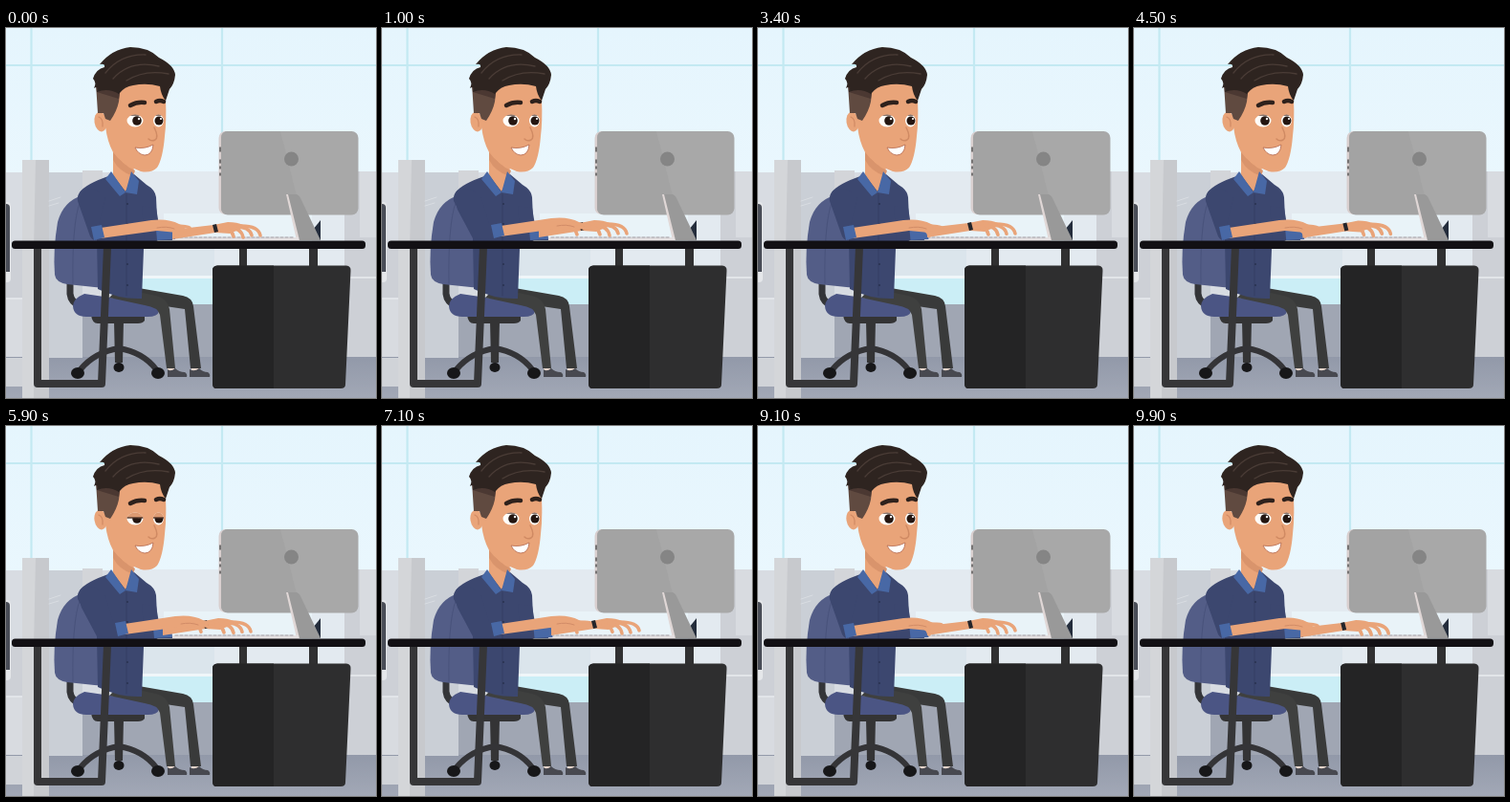
An HTML page that plays this animation: 387 by 387 pixels, repeating every 10 s.

```html
<!DOCTYPE html>
<html lang="en">
<head>
<meta charset="utf-8">
<title>Typing at a desk</title>
<style>
html, body { margin: 0; width: 100%; height: 100%; overflow: hidden; background: #e6f5fd; }
svg { display: block; width: 100vw; height: 100vh; }
.skin { fill: #e9a479; }
.shade { fill: #d9946c; }
.shirt { fill: #3c476f; }
.cuff { fill: #4868a5; }
.dark { fill: #343435; }
.hair { fill: #2e2420; }
.line { fill: none; stroke-linecap: round; stroke-linejoin: round; }
</style>
</head>
<body>
<svg viewBox="0 0 387 387">
  <defs>
    <linearGradient id="sky" x2="0" y2="1">
      <stop stop-color="#e5f5fd"/><stop offset=".6" stop-color="#ecf8fe"/><stop offset="1" stop-color="#d5f0f8"/>
    </linearGradient>
    <linearGradient id="floor" x2="0" y2="1">
      <stop stop-color="#9299a9"/><stop offset="1" stop-color="#a2a8b6"/>
    </linearGradient>
    <clipPath id="eyes">
      <ellipse cx="135" cy="97" rx="8.5" ry="6.5"/><ellipse cx="159.500" cy="97" rx="5.5" ry="6.5"/>
    </clipPath>
  </defs>

  <!-- office -->
  <path fill="url(#sky)" d="M0 0H387V387H0Z"/>
  <path class="line" stroke="#c3e9f2" stroke-width="2.2" d="M0 39H387M26.5 0V150M226 0V190"/>
  <path fill="#d8dce2" d="M0 151H130V300H0Z"/>
  <path fill="#e3eaf0" d="M130 150H387V260H130Z"/>
  <path fill="#e9f3f8" d="M165 194H320V223H165Z"/>
  <path fill="#dbe5ec" d="M130 231H218V259H130Z"/>
  <path fill="#f0f6f9" d="M130 259H218V262H130Z"/>
  <path fill="#cbeef6" d="M130 262H218V289H130Z"/>
  <path fill="#cdd0d6" d="M0 231H80V345H0ZM354 150H387V345H354Z"/>
  <path fill="#d8dbe0" d="M0 284H17V345H0ZM370 150H387V219H370Z"/>
  <path fill="#e2e5e9" d="M0 282H17V284H0ZM360 260H387V262H360Z"/>
  <path fill="#a0a6b3" d="M66 289H218V345H66Z"/>
  <path fill="url(#floor)" d="M0 344H387V387H0Z"/>
  <path fill="#c7c9cd" d="M17 138H45V387H17Z"/>
  <path fill="#d4d6d9" d="M17 138H31L29 231V387H17Z"/>
  <path fill="#cacfd6" d="M45 151H80V345H45Z"/>
  <path fill="#d3d5d9" d="M80 149H101V231H80Z"/>
  <path class="line" stroke="#d9dde2" d="M45 181L57 177M45 186L55 183"/>
  <path fill="#d0d3d8" d="M0 345H17V375H0Z"/>
  <rect x="-10" y="182" width="15" height="84" rx="4" fill="#e5e7ea"/>
  <path fill="#494d57" d="M0 184Q4 184 4 188V255H0Z"/>

  <!-- chair -->
  <path class="line" stroke="#343538" stroke-width="7" d="M67 264V278Q68 287 78 291"/>
  <path fill="#535d87" d="M80 175Q60 181 54 203Q49 232 51 258Q52 266 64 268L102 272V190Z"/>
  <path class="line" stroke="#48527b" d="M77 183Q69 205 70 267"/>
  <path class="dark" d="M89 300H145V306Q143 309 138 309H96Q90 309 89 300ZM113 306H123L122 350H114Z"/>
  <path class="line" stroke="#343437" stroke-width="6" d="M118 335Q93 339 78 357M118 335Q143 339 157 357"/>
  <g fill="#171719">
    <ellipse cx="75" cy="361" rx="7" ry="6"/><ellipse cx="118" cy="355" rx="5.5" ry="5"/><ellipse cx="159" cy="361" rx="7" ry="6"/>
  </g>
  <path fill="#4b5584" d="M82 278L150 288Q160 290 160 296Q159 302 148 302H84Q71 302 70 291Q70 283 82 278Z"/>

  <!-- legs -->
  <path fill="#e6d5cb" d="M169 351H176V360H169ZM194 351H202V360H194Z"/>
  <path fill="#393a3a" d="M133 271L185 280Q195 282 196 291L204 356H193L187 294L160 290L142 286Z"/>
  <path fill="#3f403f" d="M118 272L157 280Q169 283 171 294L177 356H168L161 300Q159 292 145 290L108 282Z"/>
  <path fill="#484950" d="M169 357Q172 360 177 356Q181 360 187 360Q190 362 189 365H169ZM192 357Q197 360 202 356Q206 360 211 360Q214 362 213 365H192Z"/>

  <!-- body -->
  <path class="shirt" d="M110 154Q83 163 77 172Q75 176 79 190L95 220L96 273Q118 284 142 283L144 231L159 222L157 177Q156 169 147 164L134 153Z"/>
  <path class="line" stroke="#353f65" d="M126 174V280"/>
  <g fill="#29324f"><circle cx="127" cy="184" r="1"/><circle cx="127" cy="205" r="1"/><circle cx="127" cy="247" r="1"/><circle cx="127" cy="269" r="1"/></g>
  <path class="skin" d="M112 122L135 140L132 157L125 171L112 154Z"/>
  <path class="shade" d="M112 128Q122 144 135 149L133 155Q118 150 112 138Z"/>
  <path class="cuff" d="M110 150L125 172L119 176L104 158ZM131 150L139 160L137 174L125 172Z"/>

  <!-- head -->
  <ellipse class="skin" cx="99" cy="98" rx="6.5" ry="10.5" transform="rotate(-9 99 98)"/>
  <path class="line" stroke="#d08a64" stroke-width="1.2" d="M97 93Q102 95 101 103"/>
  <path class="skin" d="M104 65L125 55H163L167 75Q168 97 166 113Q164 137 158 146Q152 152 141 150Q121 143 112 130Q106 119 104 103Z"/>
  <path fill="#604a40" d="M94 58L120 59L118 77Q116 87 109 97L104 95L102 89L96 89Z"/>
  <path fill="#4b3832" d="M94 58L120 59L118 74L95 67Z"/>
  <path class="hair" d="M91 53Q94 43 103 41Q104 37 98 38Q111 22 130 20Q149 20 160 31Q176 39 177 49Q176 59 171 64L167 76Q162 70 161 61Q147 57 133 60Q124 61 118 69Q107 62 95 67Q97 60 92 63Q95 57 91 53Z"/>
  <path class="line" stroke="#4a3c36" stroke-width="1.3" d="M104 47Q120 27 146 28M112 53Q130 33 160 40M126 55Q145 43 170 48"/>
  <path class="line" stroke="#2e211c" stroke-width="4.5" d="M130 81Q137 77 145 78M157 77Q161 75 165 77"/>
  <g clip-path="url(#eyes)">
    <path fill="#fffdf9" d="M120 85H170V110H120Z"/>
    <g fill="#241611"><circle cx="137" cy="97" r="4.8"/><circle cx="160" cy="97" r="4.5"/></g>
    <g fill="#fff"><circle cx="139" cy="95" r="1.2"/><circle cx="162" cy="95" r="1.1"/></g>
    <rect id="lid" fill="#dc9a72" stroke="#4a3026" stroke-width="1.3" x="118" y="70" width="54" height="21"/>
  </g>
  <path class="line" stroke="#d08a63" stroke-width="1.5" d="M155 104Q160 114 156 117Q152 119 149 116"/>
  <path fill="#fff" stroke="#b4694f" stroke-width=".8" d="M135 125Q145 127 154 122Q153 133 145 133Q138 132 135 125Z"/>

  <!-- computer -->
  <rect x="222.5" y="108" width="20" height="87" rx="7" fill="#d9cfcf"/>
  <rect x="225" y="108" width="143.5" height="87.5" rx="7" fill="#a8a8a8"/>
  <path fill="#a3a3a3" d="M232 108H287L309 195H232Q225 195 225 188V115Q225 108 232 108Z"/>
  <path class="line" stroke="#555" stroke-width="1.5" d="M224 125V129M224 138V141M224 145V147M224 152V154"/>
  <circle cx="298.5" cy="137" r="7.5" fill="#858585"/>
  <path fill="#242d3c" d="M321 211L329 201V222H321Z"/>
  <path fill="#e0d7d6" d="M293 174H299L310 222H304Z"/>
  <path fill="#999" d="M295 174H304Q307 175 309 180L329 222H307Z"/>
  <path fill="#e5e1e2" d="M174 219H306V223H174Z"/>
  <path class="line" stroke="#b8b5bb" stroke-width="1.4" stroke-dasharray="3 2" stroke-linecap="butt" d="M177 219H301"/>

  <!-- far arm -->
  <path class="shirt" d="M142 186L157 188L160 206L172 209L174 222H145Z"/>
  <path id="farCuff" class="cuff" d="M157 211L175 209L177 221L158 222Z"/>
  <g id="far">
    <path class="skin" d="M174 211L217 206L232 203Q242 203 248 206L246 210L234 215L219 214L174 221Z"/>
    <path fill="#24252b" d="M216 206L220 205L222 213L218 214Z"/>
    <g id="farFingers"></g>
  </g>

  <!-- near arm -->
  <path id="upper" class="shirt"/>
  <g id="near">
    <path class="skin" d="M99 209L152 201Q170 199 181 205L188 209L179 214L158 212L99 220Z"/>
    <path class="cuff" d="M89 208L100 206L103 219L92 222Z"/>
    <g id="nearFingers"></g>
    <path class="line" stroke="#cf8a66" stroke-width=".9" d="M158 209Q168 207 176 210"/>
  </g>

  <!-- desk -->
  <path class="line" stroke="#363638" stroke-width="8" d="M33 229V372H100L106 229"/>
  <path fill="#303031" d="M244 230H252V250H244ZM317 230H326V250H317Z"/>
  <path fill="#2e2e2f" d="M221 248.500H356Q361 249 360.500 254L355 373Q355 377 350 377H220Q216 377 216 372V253Q216 249 221 248.500Z"/>
  <path fill="#242425" d="M221 248.500H280V377H220Q216 377 216 372V253Q216 249 221 248.500Z"/>
  <rect x="6" y="222.500" width="370" height="8.500" rx="3.500" fill="#121014"/>
</svg>
<script>
const LOOP = 10000, CYCLE = 5000, STEP = 100;
const get = id => document.getElementById(id);
const set = (id, name, value) => get(id).setAttribute(name, value);
const move = (id, x, y) => set(id, 'transform', `translate(${x} ${y})`);
const ease = (t, from, to) => {
  const x = Math.min(1, Math.max(0, (t - from) / (to - from)));
  return x * x * (3 - 2 * x);
};

// Each finger is a knuckle and a tip that taps on its own phase.
function fingers(id, list, t) {
  get(id).innerHTML = list.map(([x, y, tipX, tipY], i) => {
    const lift = 1.2 * Math.max(0, Math.sin(2 * Math.PI * (t / 500 + i * .3)));
    return `<path class="line" stroke="#e9a479" stroke-width="3.6"
      d="M${x} ${y}Q${tipX - 2} ${y} ${tipX} ${tipY - lift}"/>`;
  }).join('');
}

function draw(now) {
  const t = Math.floor(now % LOOP / STEP) * STEP, c = t % CYCLE;
  const reach = ease(c, 300, 800) - ease(c, 2500, 3100);
  const back = ease(c, 400, 800) - ease(c, 1100, 1600);
  const dx = 25 * reach, dy = -2 * reach;
  const farX = 3 * ease(c, 1500, 2000) - 3 * ease(c, 4300, 5000) - 10 * back;
  const farY = -2 * (ease(c, 500, 900) - ease(c, 4300, 5000));

  move('near', dx, dy);
  move('far', farX, farY);
  move('farCuff', Math.max(-3, farX / 2), 0);
  set('upper', 'd', `M79 170Q74 174 75 181L${88 + dx * .3} 218
    Q${92 + dx * .6} 224 ${95 + dx} 221L${99 + dx} ${206 + dy}
    L${97 + dx * .6} 205L104 178Q94 164 79 170Z`);
  fingers('nearFingers', [[176, 207, 192, 209], [171, 210, 187, 213], [166, 209, 179, 218]], t);
  fingers('farFingers', [[246, 207, 266, 217], [240, 208, 257, 218], [234, 209, 248, 219], [228, 210, 238, 218]], t);

  const blink = ease(c, 600, 800) - ease(c, 800, 980);
  move('lid', 0, 12 * blink);
  requestAnimationFrame(() => draw(performance.now() - start));
}
const start = performance.now();
draw(0);
</script>
</body>
</html>
```
